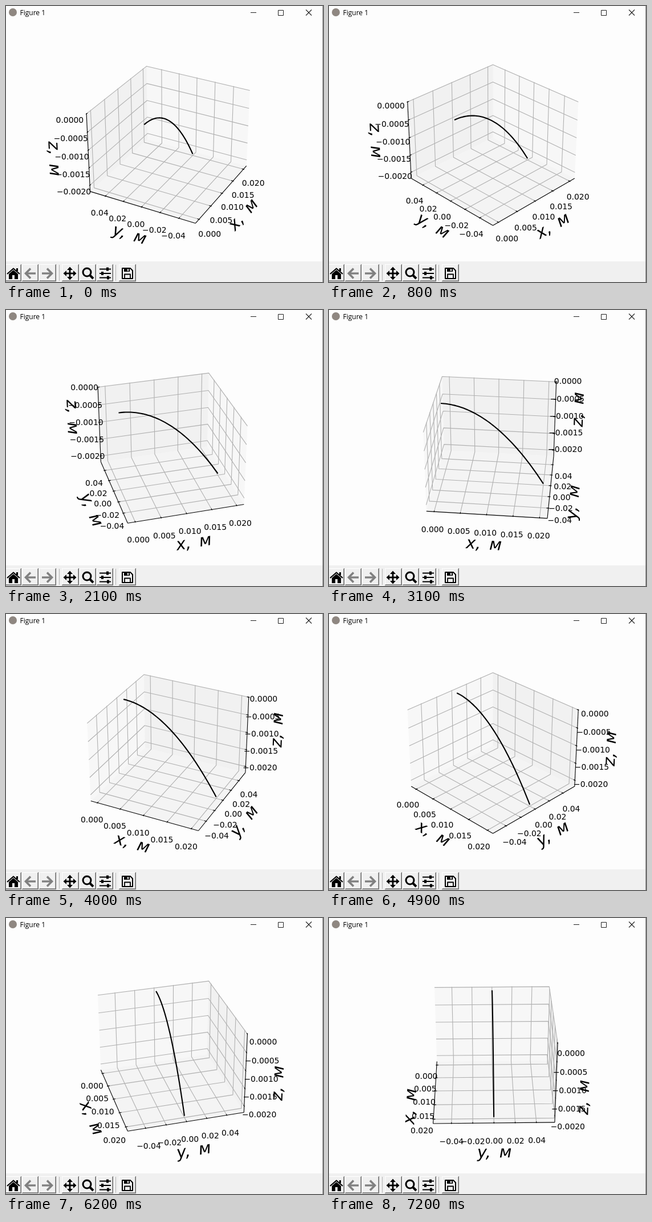
These frames come from a looping animation (556x482 px, 7800 ms). An HTML page with a canvas:

```html
<!DOCTYPE html>
<html lang="en">
<head>
<meta charset="utf-8">
<title>Figure 1</title>
<style>
  html, body { margin: 0; width: 100%; height: 100%; overflow: hidden; background: #fdfdfd; }
  canvas { display: block; }
</style>
</head>
<body>
<canvas id="stage" width="556" height="482"></canvas>
<script>
const ctx = document.getElementById('stage').getContext('2d');
const LOOP = 7800, STEP = 100;

// Camera and box geometry, in box units around the centre of the plot.
const CENTER = { x: 287.5, y: 235.3 }, SCALE = 1740, DIST = 10;
const SIN_EL = 0.5, COS_EL = Math.sqrt(3) / 2;
const WIDTH = 1.1429, EDGE = 0.5953, EDGE_Z = 0.4464;
const PAD = 0.1155, PAD_Z = 0.0866, TITLE_PAD = 0.2511, TITLE_PAD_Z = 0.1883;

const toX = v => ((v + 0.001) / 0.022 - 0.5) * WIDTH;
const toY = v => v / 0.11 * WIDTH;
const toZ = v => 0.44 + v * 406.5;

const ticks = (from, step, digits, map) => Array.from({ length: 5 }, (_, i) => {
  const v = from + i * step;
  const zero = Math.abs(v) < step / 10;
  const text = (zero ? 0 : Math.abs(v)).toFixed(digits);
  return { at: map(v), text: v < 0 && !zero ? '\u2212' + text : text };
});
const xTicks = ticks(0, 0.005, 3, toX);
const yTicks = ticks(-0.04, 0.02, 2, toY);
const zTicks = ticks(-0.002, 0.0005, 4, toZ);

// The box turns steadily in whole degrees and stops at -1.
const azimuth = step => Math.min(-1, Math.round(-152.4 + 2.2 * step)) * Math.PI / 180;

function projector(angle) {
  const c = Math.cos(angle), s = Math.sin(angle);
  return ([x, y, z]) => {
    const near = x * c + y * s;
    const k = SCALE / (DIST - near * COS_EL - z * SIN_EL);
    return [CENTER.x + (y * c - x * s) * k, CENTER.y + (near * SIN_EL - z * COS_EL) * k];
  };
}

function trace(points, closed) {
  ctx.beginPath();
  points.forEach(([x, y], i) => i ? ctx.lineTo(x, y) : ctx.moveTo(x, y));
  if (closed) ctx.closePath();
}
function line(points, color, width) {
  trace(points);
  ctx.strokeStyle = color;
  ctx.lineWidth = width;
  ctx.stroke();
}
function fill(points, color) {
  trace(points, true);
  ctx.fillStyle = color;
  ctx.fill();
}
function rect(x, y, w, h, color) {
  ctx.fillStyle = color;
  ctx.fillRect(x, y, w, h);
}
function disc(x, y, r, color) {
  ctx.fillStyle = color;
  ctx.beginPath();
  ctx.arc(x, y, r, 0, Math.PI * 2);
  ctx.fill();
}

function drawPlot(angle) {
  const project = projector(angle);
  const path = points => points.map(project);
  const side = Math.cos(angle) < 0 ? -1 : 1;
  const E = EDGE, Z = EDGE_Z, near = side * E, far = -near;
  ctx.lineCap = 'butt';
  ctx.lineJoin = 'round';

  fill(path([[far, -E, -Z], [far, E, -Z], [far, E, Z], [far, -E, Z]]), 'rgba(242,242,242,.5)');
  fill(path([[-E, E, -Z], [E, E, -Z], [E, E, Z], [-E, E, Z]]), 'rgba(230,230,230,.5)');
  fill(path([[-E, -E, -Z], [E, -E, -Z], [E, E, -Z], [-E, E, -Z]]), 'rgba(236,236,236,.5)');

  const axes = [
    {
      name: 'x', ticks: xTicks, ends: [[-E, -E, -Z], [E, -E, -Z]],
      grid: v => [[v, -E, -Z], [v, E, -Z], [v, E, Z]],
      mark: (v, out) => [v, -E - out, -Z],
      label: v => [v, -E - PAD, -Z - PAD_Z],
      title: [0, -E - TITLE_PAD, -Z - TITLE_PAD_Z]
    },
    {
      name: 'y', ticks: yTicks, ends: [[near, -E, -Z], [near, E, -Z]],
      grid: v => [[near, v, -Z], [far, v, -Z], [far, v, Z]],
      mark: (v, out) => [near + side * out, v, -Z],
      label: v => [near + side * PAD, v, -Z - PAD_Z],
      title: [near + side * TITLE_PAD, 0, -Z - TITLE_PAD_Z]
    },
    {
      name: 'z', ticks: zTicks, ends: [[near, E, -Z], [near, E, Z]],
      grid: v => [[near, E, v], [far, E, v], [far, -E, v]],
      mark: (v, out) => [near + side * out, E, v],
      label: v => [near + side * PAD, E + PAD, v],
      title: [near + side * TITLE_PAD, E + TITLE_PAD, 0]
    }
  ];

  for (const axis of axes)
    for (const t of axis.ticks) line(path(axis.grid(t.at)), '#b0b0b0', 1.1);

  ctx.textAlign = 'center';
  for (const axis of axes) {
    const ends = path(axis.ends);
    line(ends, '#000', 1.1);
    ctx.font = '13.9px "DejaVu Sans", sans-serif';
    for (const t of axis.ticks) {
      line(path([axis.mark(t.at, 0.0095), axis.mark(t.at, -0.019)]), '#000', 1.1);
      const [x, y] = project(axis.label(t.at));
      ctx.fillStyle = '#000';
      ctx.fillText(t.text, x, y + 11.6);
    }
    drawTitle(axis.name, project(axis.title), ends);
  }

  const curve = Array.from({ length: 61 }, (_, i) => {
    const x = i / 60 * 0.02;
    return [toX(x), 0, toZ(-5.34 * x * x)];
  });
  line(path(curve), '#000', 2.1);
}

function drawTitle(name, [x, y], [[x0, y0], [x1, y1]]) {
  const flip = x1 < x0 ? -1 : 1;
  ctx.save();
  ctx.translate(x, y);
  ctx.rotate(Math.atan2(flip * (y1 - y0), flip * (x1 - x0)));
  ctx.font = 'italic 28.8px "DejaVu Sans", sans-serif';
  ctx.fillText(name + ',\u2009 \u043c', 0, 6.5);
  ctx.restore();
}

function drawTitleBar() {
  disc(12, 11, 7, '#8f8781');
  ctx.font = '12px "Open Sans", sans-serif';
  ctx.textAlign = 'left';
  ctx.fillStyle = '#000';
  ctx.fillText('Figure 1', 24.5, 16);
  line([[429, 11.5], [439, 11.5]], '#222', 1);
  ctx.strokeRect(477.5, 7.5, 9, 9);
  line([[526, 6.5], [536, 16.5]], '#222', 1.1);
  line([[536, 6.5], [526, 16.5]], '#222', 1.1);
}

function button(x, w) {
  rect(x, 451, w, 30, '#696969');
  rect(x, 451, w - 1, 29, '#fff');
  rect(x + 1, 452, w - 2, 28, '#a0a0a0');
  rect(x + 1, 452, w - 3, 27, '#f0f0f0');
}

function arrow(x, y, angle, color, shaft) {
  ctx.save();
  ctx.translate(x, y);
  ctx.rotate(angle);
  if (shaft) {
    ctx.lineJoin = 'miter';
    line([[-9, 0], [8, 0]], color, 3.4);
    line([[0, -8.5], [8.5, 0], [0, 8.5]], color, 3.6);
  } else {
    line([[0, 0], [8, 0]], color, 2.8);
    fill([[6, -5], [11.5, 0], [6, 5]], color);
  }
  ctx.restore();
}

function drawToolbar() {
  rect(0, 446, 556, 36, '#f0f0f0');
  [[-2, 29], [28, 29], [58, 30], [98, 30], [129, 29], [159, 29], [198, 30]].forEach(b => button(...b));
  rect(93, 452, 1, 28, '#b4b4b4');
  rect(192, 452, 1, 28, '#b4b4b4');

  line([[2, 468], [13, 458.5], [24, 468]], '#000', 2.2);
  fill([[5, 468], [13, 461], [21, 468], [21, 477], [15, 477], [15, 470], [11, 470], [11, 477], [5, 477]], '#000');
  rect(18, 458, 3, 5, '#000');

  arrow(43, 467, Math.PI, '#808080', true);
  arrow(72, 467, 0, '#808080', true);
  for (let i = 0; i < 4; i++) arrow(112, 467, i * Math.PI / 2, '#000', false);

  ctx.strokeStyle = '#000';
  ctx.lineWidth = 3;
  ctx.beginPath();
  ctx.arc(142, 465, 7, 0, Math.PI * 2);
  ctx.stroke();
  line([[147, 470], [153, 476]], '#000', 4);

  [[459.5, 178], [467, 169], [474.5, 179]].forEach(([y, knob]) => {
    line([[164, y], [184, y]], '#000', 2);
    rect(knob - 2, y - 3, 4, 6, '#000');
  });

  trace([[204, 458], [218, 458], [222, 462], [222, 476], [204, 476]], true);
  ctx.lineWidth = 2;
  ctx.stroke();
  rect(207, 458, 10, 6, '#000');
  rect(213, 459, 2, 4, '#f0f0f0');
  line([[208, 476], [208, 468.5], [218, 468.5], [218, 476]], '#000', 1.8);
}

function frame(now) {
  const step = Math.floor(now % LOOP / STEP);
  rect(0, 0, 556, 482, '#fdfdfd');
  drawPlot(azimuth(step));
  drawTitleBar();
  drawToolbar();
  rect(555, 0, 1, 482, '#8c8c8c');
}

const start = performance.now();
function tick() {
  frame(performance.now() - start);
  requestAnimationFrame(tick);
}
tick();
</script>
</body>
</html>
```
